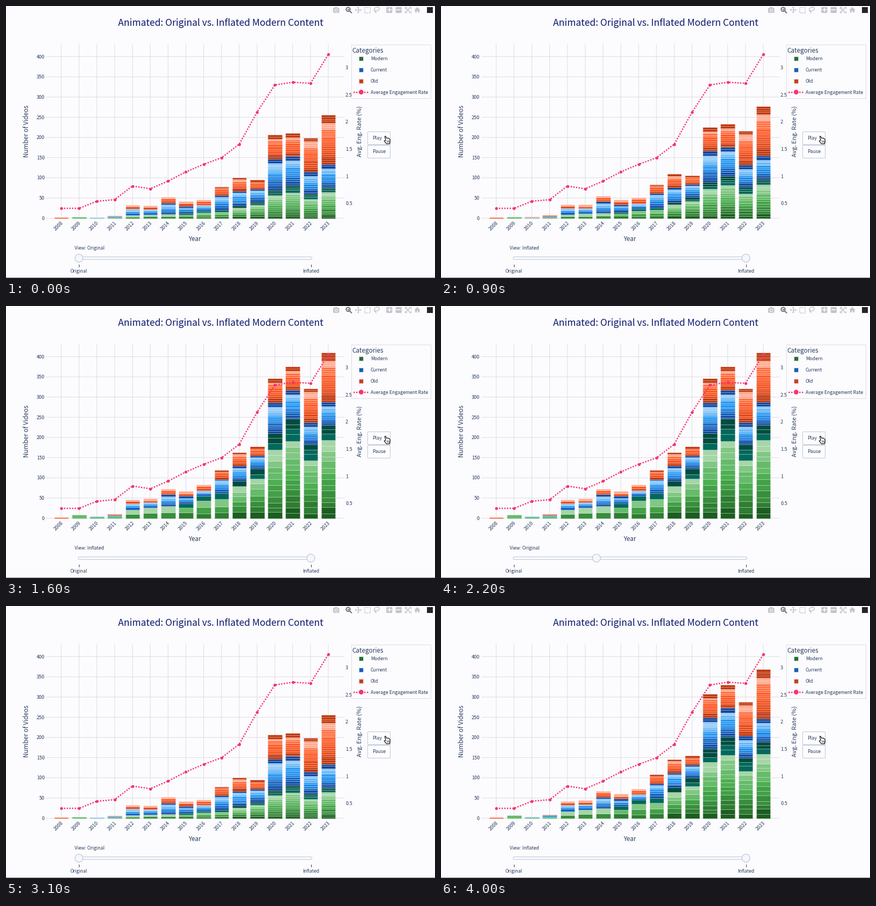
A matplotlib script that plays this animation: 800 px wide and 507 px high, repeating every 4.1 s.

```python
import matplotlib.pyplot as plt
import numpy as np
from matplotlib.animation import FuncAnimation
from matplotlib.collections import PolyCollection
from matplotlib.patches import Circle, Ellipse, FancyBboxPatch, Polygon, Rectangle

W, H, DPI = 800, 507, 100
PX = 72 / DPI                      # points per pixel
FRAMES, STEP = 41, 100

PAGE, GRID, INK, NAVY = "#fcfbfe", "#dedee3", "#2a3f5f", "#0d1a6c"
BORDER, SOFT, PINK = "#bec8d9", "#f7f9fc", "#f6356e"
ICON, ICON_ON = "#c3c3c9", "#77777f"

plt.rcParams["font.family"] = ["Noto Sans CJK JP", "DejaVu Sans"]
fig = plt.figure(figsize=(W / DPI, H / DPI), dpi=DPI, facecolor=PAGE)
ax = fig.add_axes([0, 0, 1, 1])
ax.set_xlim(0, W)
ax.set_ylim(H, 0)
ax.axis("off")

# ---------- chart data, one value per year ----------
FIRST = 2008
MODERN = [0, 3, 1, 1.5, 7, 8.5, 10, 12, 18.5, 20.5, 31, 41, 70, 82, 61, 77]
CURRENT = [0, 0, 1, 3, 16, 13.5, 28.5, 18.5, 13.5, 35.5, 36.5, 32, 77, 71, 54.5, 57]
OLD = [2, 0, .5, 2, 9, 9.5, 14.5, 12, 14, 22, 33, 22, 59, 58, 83.5, 122]
RATE = [.41, .41, .54, .57, .82, .77, .91, 1.08, 1.22, 1.34, 1.59, 2.18, 2.68, 2.73, 2.71, 3.24]
BOOST = 3                          # factor on modern videos when inflated

GREENS = ["#1b5e20", "#2e7d32", "#388e3c", "#43a047", "#4caf50", "#66bb6a",
          "#81c784", "#a5d6a7", "#00695c", "#004d40"]
BLUES = ["#0d47a1", "#1565c0", "#1e88e5", "#2196f3", "#64b5f6", "#90caf9", "#0d47a1"]
ORANGES = ["#bf360c", "#e64a19", "#f4511e", "#ff5722", "#ff7043", "#ffab91", "#bf360c"]

BASE, BAR = 395.5, 26.6
YEAR_X = 103 + 33.2 * np.arange(len(MODERN))


def video_y(count):
    return BASE - .7525 * count


def rate_y(rate):
    return 418.65 - 101.3 * rate


# ---------- stacked bars ----------
rng = np.random.default_rng(4)


def stack(total, shades, size):
    """Cut a total into uneven cells that run through the shades."""
    n = max(1, round(total / size))
    edges = np.cumsum(np.r_[0, rng.uniform(.75, 1.25, n)])
    edges *= total / edges[-1]
    for j in range(n):
        yield edges[j], edges[j + 1], shades[int((j + .5) / n * len(shades))]


def build_cells():
    """Each cell edge sits at fixed + boost * scaled videos."""
    for x, modern, current, old in zip(YEAR_X, MODERN, CURRENT, OLD):
        for a, b, shade in stack(modern, GREENS, 4.6):
            yield x, (0, 0), (a, b), shade
        for total, shades, lift in ((current, BLUES, 0), (old, ORANGES, current)):
            for a, b, shade in stack(total, shades, 4.8):
                yield x, (lift + a, lift + b), (modern, modern), shade


cells = [c for c in build_cells() if c[1][1] + c[2][1] > 0]
centre, fixed, scaled = (np.array(part) for part in list(zip(*cells))[:3])
fills = [c[3] for c in cells]


def bar_verts(growth):
    low, high = video_y(fixed + scaled * (1 + (BOOST - 1) * growth)).T
    left, right = centre - BAR / 2, centre + BAR / 2
    xs = np.stack([left, right, right, left], axis=1)
    return np.stack([xs, np.stack([low, low, high, high], axis=1)], axis=2)


# ---------- drawing helpers ----------
def text(x, y, s, size=8.75, color=INK, ha="left", rot=0, z=6):
    return ax.text(x, y, s, fontsize=size * PX, color=color, ha=ha, va="baseline",
                   rotation=rot, rotation_mode="anchor", zorder=z)


def line(xs, ys, color=GRID, width=1, z=1, **kw):
    ax.plot(xs, ys, color=color, lw=width * PX, zorder=z, **kw)


def box(x0, y0, x1, y1, face=PAGE, edge="none", width=1, z=5, **kw):
    ax.add_patch(Rectangle((x0, y0), x1 - x0, y1 - y0, fc=face, ec=edge,
                           lw=width * PX, zorder=z, **kw))


def rounded(x0, y0, x1, y1, radius, face=SOFT, edge=BORDER, z=5):
    ax.add_patch(FancyBboxPatch((x0, y0), x1 - x0, y1 - y0, fc=face, ec=edge, lw=PX, zorder=z,
                                boxstyle=f"round,pad=0,rounding_size={radius}"))


def shape(points, face, edge="none", width=1, z=5):
    ax.add_patch(Polygon(points, fc=face, ec=edge, lw=width * PX, zorder=z, joinstyle="round"))


def dots(xs, ys, z):
    line(xs, ys, PINK, 2.5, z, ls=(0, (1, 1)), dash_capstyle="butt")


# ---------- axes ----------
def draw_axes():
    for i, x in enumerate(YEAR_X):
        line([x, x], [71, BASE], snap=False)
        text(x + 4, 404.5, str(FIRST + i), 9, ha="right", rot=45)
    for v in range(0, 401, 50):
        line([75, 631], [video_y(v)] * 2, snap=False)
        text(72, video_y(v) + 3.2, str(v), 9.1, ha="right")
    for v in np.arange(.5, 3.1, .5):
        text(633, rate_y(v) + 3.3, f"{v:g}", 9.1, z=3)
    text(400, 37, "Animated: Original vs. Inflated Modern Content", 17.5, NAVY, "center")
    text(352, 438.3, "Year", 11.6, ha="center")
    text(42.5, 233, "Number of Videos", 11.7, ha="center", rot=90)
    text(663, 233.3, "Avg. Eng. Rate (%)", 11.3, ha="center", rot=90)


def draw_rate():
    ys = rate_y(np.array(RATE))
    dots(YEAR_X, ys, 4)
    line(YEAR_X, ys, PINK, 0, 4, ls="none", marker="o", ms=5.4 * PX, mew=0)


def draw_legend():
    box(643.5, 71.5, 791.5, 171.5, PAGE, GRID)
    text(645, 87, "Categories", 11.7)
    names = ("Modern", "Current", "Old", "Average Engagement Rate")
    for i, (name, color) in enumerate(zip(names, ("#237030", "#1560bd", "#d23c14", None))):
        y = 97.8 + 20.9 * i
        text(680, y + 3.3, name)
        if color:
            box(658, y - 4, 666, y + 4, color, "#d5dbe3", z=6)
        else:
            dots([648, 677], [y, y], 6)
            ax.add_patch(Circle((662.3, y), 4.4, fc=PINK, ec="none", zorder=6))


# ---------- controls ----------
def draw_cursor():
    hand = [(706.3, 243.2), (708, 242.6), (709.6, 246.4), (713, 246.2), (716, 248.4),
            (716.4, 251.5), (715.4, 256.6), (709.4, 256.8), (705.2, 251.3), (708, 250.6)]
    shape(hand, "white", "#111111", 1.2, 8)
    for x in (710.6, 712.4, 714.2):
        line([x, x + .3], [251, 254.2], "#111111", .7, 9)


def draw_controls():
    rounded(134.5, 467.5, 570.5, 472.5, 2.4)
    for x, name in ((136, "Original"), (568.5, "Inflated")):
        line([x, x], [481.5, 486], "#333a48", 1, 5)
        text(x, 497.3, name, 8.7, ha="center")
    for y, name in ((234.5, "Play"), (259.5, "Pause")):
        rounded(674.5, y, 716.5, y + 24, 1.5, "#fdfdff")
        text(683, y + 14.6, name, 8.9)
    box(0, 505.6, W, H, "#8d8a94", z=2)


# ---------- toolbar ----------
def draw_camera():
    rounded(610.5, 4, 621, 12.2, 1.2, ICON, ICON)
    box(613.4, 2.4, 618, 4.5, ICON)
    ax.add_patch(Circle((615.8, 8), 2.5, fc=ICON, ec=PAGE, lw=1.1 * PX, zorder=6))


def draw_lens(x, y):
    ax.add_patch(Circle((x, y), 3.7, fc="none", ec=ICON_ON, lw=2 * PX, zorder=5))
    line([x + 2.8, x + 6.2], [y + 2.9, y + 6.3], ICON_ON, 2.2, 5)
    line([x - 1.8, x + 1.8], [y, y], ICON_ON, 1, 5)
    line([x, x], [y - 1.8, y + 1.8], ICON_ON, 1, 5)


def draw_arrows(x, y):
    for dx, dy in ((1, 0), (-1, 0), (0, 1), (0, -1)):
        line([x, x + 5 * dx], [y, y + 5 * dy], ICON, 1.2, 5)
        shape([(x + 6 * dx, y + 6 * dy),
               (x + 3.4 * dx - 2.3 * dy, y + 3.4 * dy + 2.3 * dx),
               (x + 3.4 * dx + 2.3 * dy, y + 3.4 * dy - 2.3 * dx)], ICON)


def draw_selectors():
    box(668.8, 2.5, 679.2, 12.5, "none", ICON, 1.5, ls=(0, (1.6, 1)))
    ax.add_patch(Ellipse((691.5, 5.7), 10, 6.6, angle=-20, fc="none", ec=ICON,
                         lw=1.5 * PX, zorder=5))
    line([688, 687.4, 689.2, 690], [8.2, 10, 10.8, 12.8], ICON, 1.4, 5)


def draw_zoom_buttons(plus, minus, y):
    for x in (plus, minus):
        rounded(x - 5, y - 5, x + 5, y + 5, 1, ICON, ICON)
        line([x - 3, x + 3], [y, y], PAGE, 1.7, 6)
    line([plus, plus], [y - 3, y + 3], PAGE, 1.7, 6)


def draw_autoscale(x, y):
    for sx in (-1, 1):
        for sy in (-1, 1):
            line([x + 2.4 * sx, x + 5.2 * sx, x + 5.2 * sx],
                 [y + 5 * sy, y + 5 * sy, y + 2.4 * sy], ICON, 1.4, 5)
        line([x - 3.2, x + 3.2], [y - 3.2 * sx, y + 3.2 * sx], ICON, 1.6, 5)


def draw_home(x):
    shape([(x - 6, 7.6), (x, 2), (x + 6, 7.6)], ICON)
    box(x - 4.2, 7, x + 4.2, 12.4, ICON)
    box(x - 1.4, 9, x + 1.4, 12.6, PAGE)


draw_axes()
draw_rate()
draw_legend()
draw_controls()
draw_cursor()
draw_camera()
draw_lens(638, 6.3)
draw_arrows(656.5, 7.3)
draw_selectors()
draw_zoom_buttons(714.8, 732.2, 7.4)
draw_autoscale(749.3, 7.4)
draw_home(767)
box(784.5, 1.5, 796, 13, "#24242b")

bars = PolyCollection(bar_verts(0), facecolors=fills, edgecolors=(1, 1, 1, .45),
                      linewidths=.55 * PX, zorder=3)
ax.add_collection(bars, autolim=False)
grip = Circle((136, 470), 7.4, fc="#f5f7fb", ec=BORDER, lw=1.2 * PX, zorder=7)
ax.add_patch(grip)
view = text(128.5, 454.4, "View: Original", 8.7)


# ---------- motion ----------
def ease(x):
    x = min(max(x, 0), 1)
    return 4 * x ** 3 if x < .5 else 1 - 4 * (1 - x) ** 3


def state(k):
    """Bar growth, slider position and view name at frame k."""
    if k < 7:
        return 0, 0, "Original"
    turn, step = divmod(k - 7, 15)
    t = step * STEP
    growth, slide = ease((t - 78) / 375), ease((t + 62) / 112)
    if turn % 2:
        return 1 - growth, 1 - slide, "Original"
    return growth, slide, "Inflated"


def update(k):
    growth, slide, name = state(k)
    bars.set_verts(bar_verts(growth))
    grip.center = (136 + 432.5 * slide, 470)
    view.set_text("View: " + name)
    return bars, grip, view


anim = FuncAnimation(fig, update, frames=FRAMES, interval=STEP, repeat=True,
                     repeat_delay=0, blit=False)
plt.show()
```
